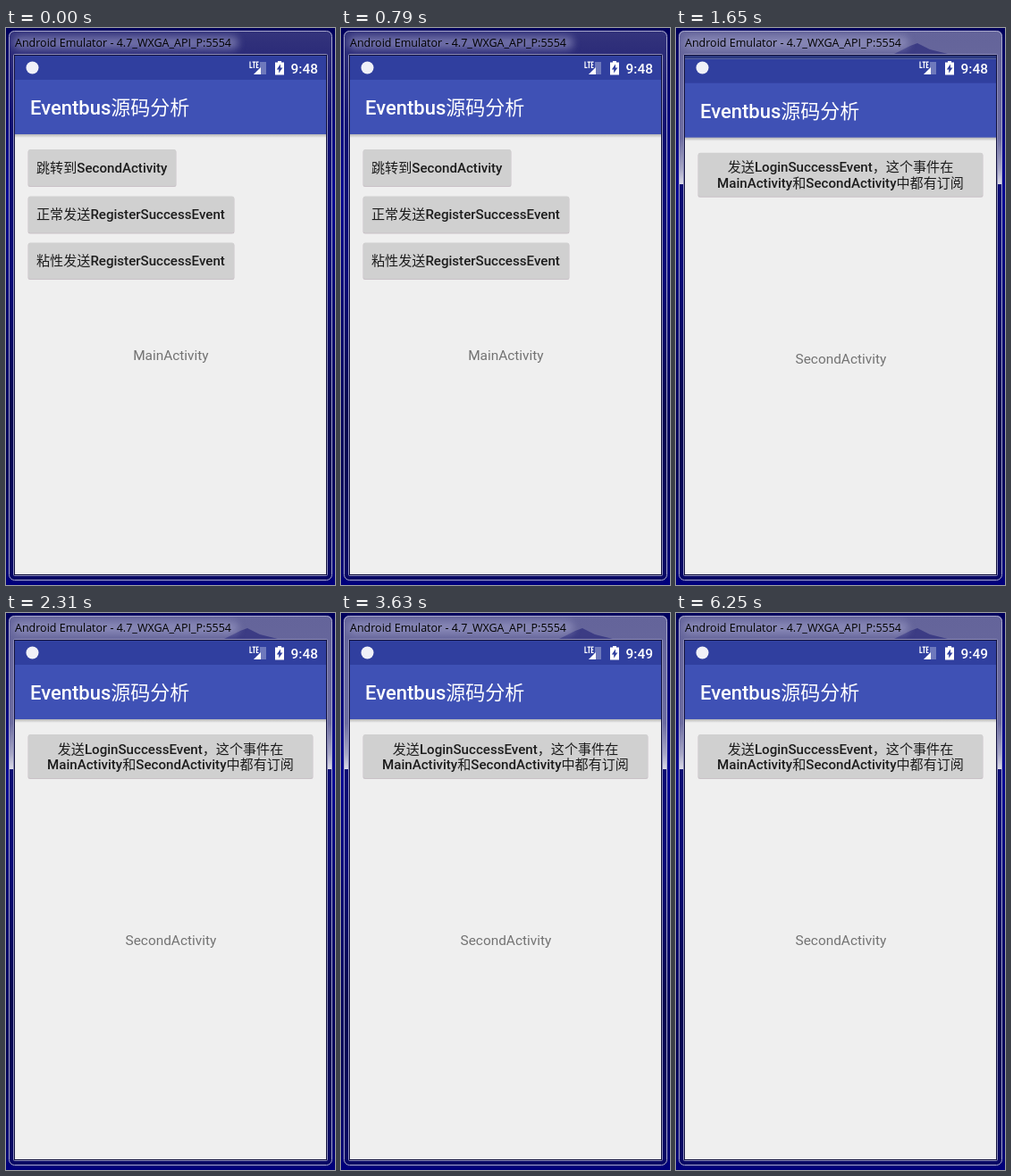
Animation, 368 px wide and 624 px high, one loop 8000 ms. Source, as an HTML page:

```html
<!DOCTYPE html>
<html lang="zh-CN">
<head>
<meta charset="utf-8">
<title>Eventbus源码分析</title>
<style>
html, body { margin: 0; width: 100%; height: 100%; overflow: hidden; background: #00005c; }
svg { display: block; width: 368px; height: 624px; }
text { font-family: Roboto, "Noto Sans CJK SC", "Noto Sans CJK", sans-serif; white-space: pre; }
.caption { font: 12.5px "Open Sans", "Noto Sans", sans-serif; fill: #000; }
.title { font-size: 22px; font-weight: 500; fill: #fff; }
.clock { font-size: 15.4px; font-weight: 500; fill: #fff; }
.label { font-size: 15.1px; font-weight: 500; fill: #1c1c1c; }
.name { font-size: 15.4px; fill: #737373; text-anchor: middle; }
.mid { text-anchor: middle; }
</style>
</head>
<body>
<svg viewBox="0 0 368 624">
  <defs>
    <linearGradient id="desk" x2="0" y2="1">
      <stop offset="0" stop-color="#00005c"/>
      <stop offset=".3" stop-color="#000094"/>
      <stop offset=".5" stop-color="#000070"/>
      <stop offset=".8" stop-color="#000058"/>
      <stop offset="1" stop-color="#00007c"/>
    </linearGradient>
    <linearGradient id="glass" x2="0" y2="1">
      <stop offset="0" stop-color="#34347c"/>
      <stop offset=".05" stop-color="#2a2a78"/>
      <stop offset=".2" stop-color="#0c0c70"/>
      <stop offset=".45" stop-color="#080878"/>
      <stop offset=".7" stop-color="#04044e"/>
      <stop offset="1" stop-color="#080866"/>
    </linearGradient>
    <linearGradient id="sky" x2="0" y2="1">
      <stop offset="0" stop-color="#64649a"/>
      <stop offset=".7" stop-color="#6c6ca0"/>
      <stop offset=".9" stop-color="#a8a8c6"/>
      <stop offset="1" stop-color="#dcdce8"/>
    </linearGradient>
    <linearGradient id="shade" x2="0" y2="1">
      <stop offset="0" stop-color="#000" stop-opacity=".24"/>
      <stop offset="1" stop-color="#000" stop-opacity="0"/>
    </linearGradient>
    <filter id="blur" x="-10%" y="-60%" width="120%" height="220%"><feGaussianBlur stdDeviation="4"/></filter>
    <clipPath id="frame"><rect x="3" y="3" width="362" height="616" rx="6"/></clipPath>
    <clipPath id="screen"><rect x="10" y="31" width="348" height="581"/></clipPath>
  </defs>

  <rect width="368" height="624" fill="url(#desk)"/>

  <g clip-path="url(#frame)">
    <rect x="3" y="3" width="362" height="616" fill="url(#glass)"/>
    <g id="backdrop">
      <rect x="3" y="3" width="362" height="172" fill="url(#sky)"/>
      <path d="M240 31L262 20L270 17L284 24L312 31Z" fill="#3c3c84"/>
    </g>
    <rect x="8" y="9" width="252" height="15" rx="7" fill="#a4a4cc" opacity=".55" filter="url(#blur)"/>
  </g>
  <rect x="3.5" y="3.5" width="361" height="615" rx="6" fill="none" stroke="#a9a9cc"/>
  <text class="caption" x="10" y="21">Android Emulator - 4.7_WXGA_API_P:5554</text>

  <rect x="8.5" y="29.5" width="351" height="584" rx="1" fill="none" stroke="#8e8ebc"/>
  <rect x="9.5" y="30.5" width="349" height="582" fill="#efefef" stroke="#10103c"/>

  <g clip-path="url(#screen)">
    <rect x="10" y="31" width="348" height="8" fill="#2b3980"/>
    <g id="page">
      <rect x="10" y="31" width="348" height="585" fill="#efefef"/>
      <rect x="10" y="31" width="348" height="28" fill="#303f9f"/>
      <rect x="10" y="58" width="348" height="61" fill="#3f51b5"/>
      <rect x="10" y="119" width="348" height="4" fill="url(#shade)"/>
      <text class="title" x="27" y="97">Eventbus源码分析</text>
      <g id="main"></g>
      <g id="second"></g>
    </g>
    <circle cx="29.5" cy="44.5" r="7" fill="#f0f1f8"/>
    <path d="M273 37.5V44.3H275.6M275.6 38.1H279.2M277.4 38V45M282.6 38.1H280.3V44.3H282.6M280.3 41.2H282.3" fill="none" stroke="#fff" stroke-width="1.2"/>
    <path d="M291 38V52H277L284 45V38Z" fill="#fff" opacity=".3"/>
    <path d="M285 44V52H277Z" fill="#fff"/>
    <path d="M304 37H308V38.5H311V52.5H301V38.5H304Z" fill="#fff"/>
    <path d="M307 40.5V44.5H309.4L305.2 50.6V46.5H302.8Z" fill="#303f9f"/>
    <text class="clock" id="clock" x="318.6" y="51">9:48</text>
  </g>
</svg>
<script>
const $ = id => document.getElementById(id);
const LOOP = 8000;
const OPEN = 1320, ENTER = 1650, SETTLE = 2310, MINUTE = 3630;

const button = (y, w, h) =>
  `<rect x="24.5" y="${y + .5}" width="${w + 1}" height="${h + .5}" rx="2.5" fill="#c9c1c7"/>` +
  `<rect x="25" y="${y}" width="${w}" height="${h}" rx="2" fill="#d0d0d0"/>`;
const label = (text, y, x = 34, cls = "") =>
  `<text class="label ${cls}" x="${x}" y="${y}">${text}</text>`;
const name = text => `<text class="name" x="184.4" y="372">${text}</text>`;

$("main").innerHTML =
  button(136, 165, 41) + label("跳转到SecondActivity", 162) +
  button(188.5, 230, 41) + label("正常发送RegisterSuccessEvent", 214) +
  button(240.5, 230, 40.5) + label("粘性发送RegisterSuccessEvent", 266) +
  name("MainActivity");

$("second").innerHTML =
  button(136, 318, 49) +
  label("发送LoginSuccessEvent，这个事件在", 157.6, 184, "mid") +
  label("MainActivity和SecondActivity中都有订阅", 175.2, 184, "mid") +
  name("SecondActivity");

const show = (id, on) => $(id).setAttribute("visibility", on ? "visible" : "hidden");

function draw() {
  const t = performance.now() % LOOP;
  show("backdrop", t >= OPEN);
  show("main", t < ENTER);
  show("second", t >= ENTER);
  const dy = t >= ENTER && t < SETTLE ? 3.7 : 0;
  $("page").setAttribute("transform", `translate(0 ${dy})`);
  $("clock").textContent = t < MINUTE ? "9:48" : "9:49";
  requestAnimationFrame(draw);
}
draw();
</script>
</body>
</html>
```
